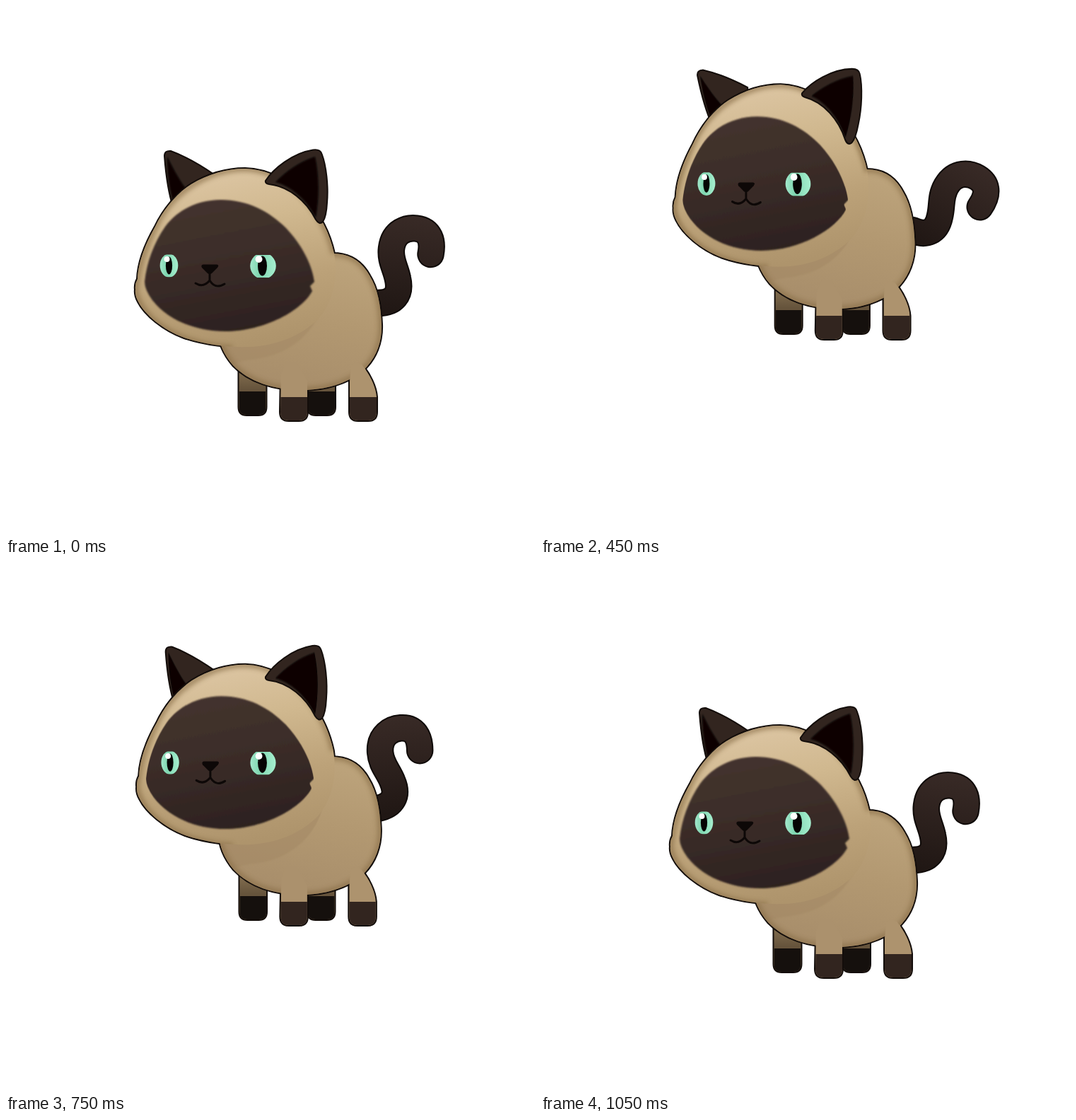
Write an HTML page that moves like this. It is 748x748 px and loops after 1.1 s.

```html
<!DOCTYPE html>
<html lang="en">
<head>
<meta charset="utf-8">
<title>Jumping cat</title>
<style>
  html, body { margin: 0; width: 100%; height: 100%; overflow: hidden; background: #fff; }
  svg { display: block; width: 100vw; height: 100vh; }
  .line { fill: none; stroke: #130d0a; stroke-width: 4; stroke-linejoin: round; }
  .rim { fill: none; stroke: #8a7049; stroke-width: 9; opacity: .65; filter: url(#soft); }
  .ear { fill: #32251f; stroke: #130d0a; stroke-width: 2; stroke-linejoin: round; }
  .black { fill: #070504; filter: url(#edge); }
  .mouth { fill: none; stroke: #0d0807; stroke-width: 3; stroke-linecap: round; stroke-linejoin: round; }
  .tail { fill: none; stroke-linecap: round; }
</style>
</head>
<body>
<svg viewBox="0 0 748 748">
  <defs>
    <filter id="soft"><feGaussianBlur stdDeviation="3"/></filter>
    <filter id="edge"><feGaussianBlur stdDeviation=".8"/></filter>
    <linearGradient id="headFill" gradientUnits="userSpaceOnUse" x1="300" y1="235" x2="345" y2="478">
      <stop offset="0" stop-color="#dcc5a2"/>
      <stop offset=".3" stop-color="#d0b88f"/>
      <stop offset=".65" stop-color="#bca279"/>
      <stop offset="1" stop-color="#ae946c"/>
    </linearGradient>
    <linearGradient id="bodyFill" gradientUnits="userSpaceOnUse" x1="470" y1="350" x2="430" y2="543">
      <stop offset="0" stop-color="#bda47c"/>
      <stop offset=".5" stop-color="#b29871"/>
      <stop offset="1" stop-color="#a88e6b"/>
    </linearGradient>
    <linearGradient id="faceFill" x1=".35" y1="0" x2=".6" y2="1">
      <stop offset="0" stop-color="#44342e"/>
      <stop offset=".5" stop-color="#3a2c28"/>
      <stop offset="1" stop-color="#2c211f"/>
    </linearGradient>
    <linearGradient id="tailFill" gradientUnits="userSpaceOnUse" x1="570" y1="297" x2="550" y2="435">
      <stop offset="0" stop-color="#382a26"/>
      <stop offset="1" stop-color="#201714"/>
    </linearGradient>
    <linearGradient id="eyeFill">
      <stop offset="0" stop-color="#a2e8cb"/>
      <stop offset=".35" stop-color="#7fd6b0"/>
      <stop offset="1" stop-color="#a6efcf"/>
    </linearGradient>
    <linearGradient id="farFill" x1="0" y1="0" x2="0" y2="1">
      <stop offset="0" stop-color="#8f7958"/>
      <stop offset=".5" stop-color="#66543c"/>
    </linearGradient>

    <path id="headShape" d="M183 401 Q182 393 186 386 C187 360 199 333 211 312
      C222 289 240 266 262 252 C285 238 312 230 338 230 C372 231 402 248 423 272
      C444 293 458 322 464 350 C470 385 462 420 442 442 C418 466 382 481 342 482
      C318 483 282 479 252 469 C222 458 196 436 187 418 Q182 409 183 401Z"/>
    <path id="bodyShape" d="M299 420 L299 455 C300 475 308 493 321 508 C343 531 378 543 420 543
      C450 543 482 534 503 517 C524 499 532 474 531 450 C530 425 526 400 514 381
      C503 361 486 350 462 350 C400 345 320 360 299 420Z"/>
    <path id="tailShape" d="M526 420 C548 420 559 408 554 386 C551 370 543 360 545 343
      C548 318 568 313 580 314.500 C600 317 604 333 600.500 351"/>
    <path id="farLeg" d="M0 505 H38 V567 Q38 578 27 578 H11 Q0 578 0 567Z"/>
    <path id="frontLeg" d="M389 520 L396 503 H411 L426 530 V574 Q426 586 414 586 H400 Q388 586 388 574Z"/>
    <path id="backLeg" d="M486 530 L488 508 Q494 500 503 507 C514 520 523 538 524 553 V574
      Q524 586 512 586 H498 Q486 586 486 574Z"/>
    <path id="faceShape" d="M196 390 C199 362 209 335 225 312 C243 287 273 274 304 274
      C341 274 372 290 396 314 C418 337 433 366 436 390 L430 396 L433 403
      C419 430 366 460 310 460 C266 460 228 443 207 416 Q196 401 196 390Z"/>
    <clipPath id="headClip"><use href="#headShape"/></clipPath>
    <clipPath id="bodyClip"><use href="#bodyShape"/></clipPath>
    <clipPath id="frontClip"><use href="#frontLeg"/></clipPath>
    <clipPath id="backClip"><use href="#backLeg"/></clipPath>
    <clipPath id="farClip"><use href="#farLeg"/></clipPath>
    <clipPath id="eyeClip"><rect x="-30" y="-15.500" width="60" height="32"/></clipPath>

    <g id="farPaw">
      <use href="#farLeg" class="line"/>
      <use href="#farLeg" fill="url(#farFill)"/>
      <rect y="545" width="38" height="40" fill="#15100d" clip-path="url(#farClip)"/>
    </g>
  </defs>

  <g data-part="tail">
    <use href="#tailShape" class="tail" stroke="#0e0907" stroke-width="38.500"/>
    <use href="#tailShape" class="tail" stroke="url(#tailFill)" stroke-width="34.500"/>
  </g>

  <g data-part="legs">
    <use href="#farPaw" x="329.500"/>
    <use href="#farPaw" x="427"/>
    <use href="#frontLeg" class="line"/>
    <use href="#backLeg" class="line"/>
  </g>

  <g data-part="head">
    <g data-part="leftEar">
      <path class="ear" d="M224 212 Q224 204 233 205 C255 213 275 225 294 238 L290 262 L236 284
        C231 268 226 240 224 212Z"/>
      <path class="black" d="M228 213 C234 225 243 243 254 258 L237 280 C232 262 228 238 228 213Z"/>
    </g>
    <use href="#headShape" class="line"/>
  </g>

  <g data-part="body">
    <use href="#bodyShape" class="line"/>
    <use href="#bodyShape" fill="url(#bodyFill)"/>
    <g clip-path="url(#bodyClip)">
      <path d="M290 400 H452 C448 450 410 495 345 500 L290 512Z" fill="#a2876480" filter="url(#edge)"/>
      <use href="#bodyShape" class="rim"/>
    </g>
  </g>

  <g data-part="legs">
    <g clip-path="url(#frontClip)">
      <rect x="380" y="495" width="60" height="100" fill="#ab916d"/>
      <rect x="380" y="553" width="60" height="40" fill="#32251f"/>
    </g>
    <g clip-path="url(#backClip)">
      <rect x="480" y="495" width="60" height="100" fill="#ad936e"/>
      <rect x="480" y="553" width="60" height="40" fill="#32251f"/>
    </g>
  </g>

  <g data-part="head">
    <use href="#headShape" fill="url(#headFill)"/>
    <g clip-path="url(#headClip)">
      <path class="rim" d="M464 350 C450 290 400 231 338 230 C290 230 235 260 211 312
        C195 345 186 370 183 401 C188 440 240 480 320 484"/>
    </g>
    <use href="#faceShape" fill="url(#faceFill)" filter="url(#edge)"/>

    <g transform="translate(230.500 367)">
      <ellipse rx="12.800" ry="16.500" fill="url(#eyeFill)" clip-path="url(#eyeClip)"/>
      <ellipse rx="4.600" ry="12.500" fill="#060504"/>
      <circle cx="-3" cy="-9" r="4" fill="#fff"/>
    </g>
    <g transform="translate(363.500 367.500)">
      <ellipse rx="18.300" ry="18.500" fill="url(#eyeFill)" clip-path="url(#eyeClip)"/>
      <ellipse cx="-1" rx="6.500" ry="14" fill="#060504"/>
      <circle cx="-6" cy="-9.500" r="5" fill="#fff"/>
    </g>

    <path d="M279 365.500 H298 Q302 366 299 370 L291 378 Q288 380 285 378 L277 370 Q275 366 279 365.500Z" fill="#0d0807"/>
    <path class="mouth" d="M288 378 V388 M268 392 Q279 399 288 388 Q296 401 309 393"/>

    <g data-part="rightEar">
      <path class="ear" d="M367 247 C378 230 405 208 434 203.500 Q444 202 446.500 209 C453 226 456 255 454 278
        Q453 298 448 305 Q443 310 438 302 C425 276 400 255 372 252 Q366 251 367 247Z"/>
      <path class="black" d="M437 213 C415 220 396 234 381 249 C402 254 425 273 438 299
        C443 272 443 240 437 213Z"/>
    </g>
  </g>
</svg>
<script>
  const LOOP = 1100, STEP = 50;

  // Each track lists [time, value] keys.
  const tracks = {
    lift: [[300, 0], [350, -37], [400, -80], [450, -115], [500, -135], [550, -146], [600, -147],
      [650, -140], [700, -115], [750, -74], [800, -22], [850, 0]],
    crouch: [[50, 0], [200, 1], [250, 1.15], [300, .3], [350, 0], [800, 0], [850, 1.1],
      [900, 1.15], [1000, .25], [1050, 0]],
    wide: [[50, 0], [200, 1], [250, 1.4], [350, 0], [450, -1.3], [600, 0], [650, 0], [750, -.6],
      [800, 0], [850, 1.2], [900, 1.35], [1050, 0]],
    head: [[50, 0], [200, 8], [250, 13], [300, -2], [350, -31], [450, -114], [500, -140], [550, -156],
      [600, -164], [650, -166], [700, -133], [750, -84], [800, -26], [850, 16], [900, 18], [1050, 0]],
    ear: [[50, 0], [200, 8], [350, 10], [450, 8], [600, 0]],
    tail: [[50, 0], [200, -22], [250, -27], [350, 0], [450, 24], [500, 22], [600, 5], [650, 0],
      [700, -3], [850, -27], [900, -21], [950, -3], [1000, 8], [1050, 0]]
  };

  function sample(keys, t) {
    const i = keys.findIndex(key => key[0] >= t);
    if (i < 0) return keys[keys.length - 1][1];
    if (i === 0) return keys[0][1];
    const [t0, v0] = keys[i - 1], [t1, v1] = keys[i];
    return v0 + (v1 - v0) * (t - t0) / (t1 - t0);
  }

  const scaleAt = (x, y, dy, sx, sy) =>
    `translate(${x} ${y + dy}) scale(${sx} ${sy}) translate(${-x} ${-y})`;

  function place(part, transform) {
    for (const el of document.querySelectorAll(`[data-part=${part}]`))
      el.setAttribute("transform", transform);
  }

  function pose(t) {
    const p = {};
    for (const name in tracks) p[name] = sample(tracks[name], t);
    const sx = 1 + .018 * p.wide, sy = 1 - .016 * p.wide;
    const tailY = p.lift + 18 * p.crouch + .6 * Math.max(0, p.tail);

    place("body", scaleAt(420, 543, p.lift + 21 * p.crouch, sx, sy));
    place("legs", scaleAt(420, 583, p.lift, sx, 1 - .28 * p.crouch));
    place("head", scaleAt(363, 459, p.head, 1 + .02 * p.wide, sy));
    place("leftEar", `rotate(${-p.ear} 262 262)`);
    place("rightEar", `rotate(${p.ear} 405 260)`);
    place("tail", `translate(${1.5 * p.wide} ${tailY}) rotate(${p.tail} 532 420)`);
  }

  const start = performance.now();
  function tick() {
    const t = (performance.now() - start) % LOOP;
    pose(Math.floor(t / STEP) * STEP);
    requestAnimationFrame(tick);
  }
  tick();
</script>
</body>
</html>
```
